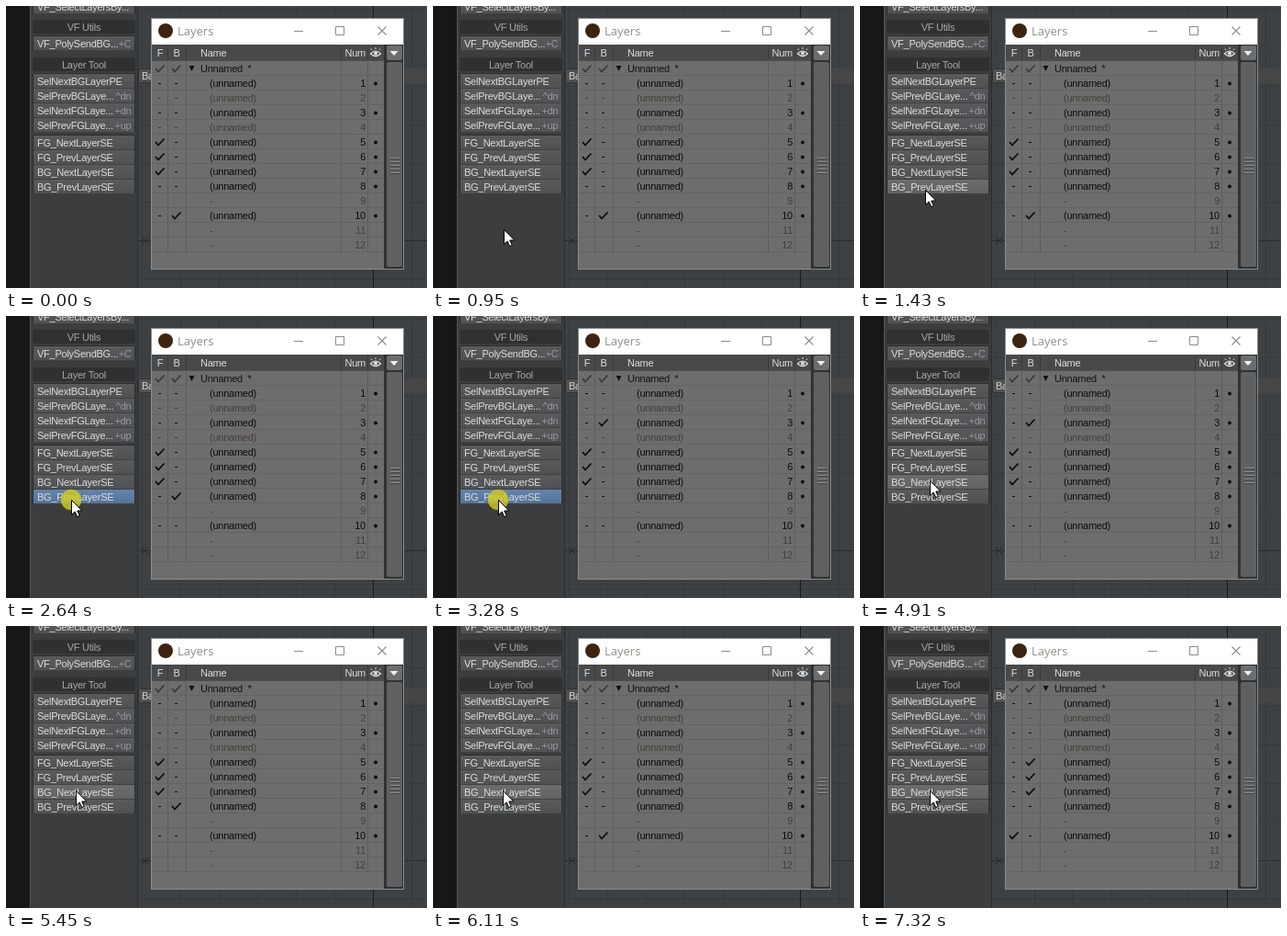
An HTML page that plays this animation: 459x307 px, repeating every 8000 ms.

```html
<!DOCTYPE html>
<html lang="en">
<head>
<meta charset="utf-8">
<title>Layer switching</title>
<style>
  html, body { margin: 0; width: 100%; height: 100%; overflow: hidden; background: #3e4143; }
  svg { display: block; width: 459px; height: 307px; }
  text { font: 11px "Liberation Sans", Arial, sans-serif; letter-spacing: -.25px; white-space: pre; }
  .title { font: 13px "Open Sans", "Noto Sans", sans-serif; letter-spacing: 0; }
</style>
</head>
<body>
<svg id="stage" viewBox="0 0 459 307"></svg>
<script>
const NS = 'http://www.w3.org/2000/svg';
const stage = document.getElementById('stage');

function add(tag, attrs, parent = stage) {
  const node = document.createElementNS(NS, tag);
  for (const key in attrs) node.setAttribute(key, attrs[key]);
  parent.appendChild(node);
  return node;
}
const rect = (x, y, width, height, fill, more) => add('rect', { x, y, width, height, fill, ...more });
const line = (d, stroke, width = 1) => add('path', { d, stroke, 'stroke-width': width, fill: 'none' });
function label(x, y, str, fill, anchor = 'start', cls = '') {
  const node = add('text', { x, y, fill, 'text-anchor': anchor, class: cls });
  node.textContent = str;
  return node;
}
function gradient(id, top, bottom) {
  const g = add('linearGradient', { id, x2: 0, y2: 1 }, defs);
  add('stop', { offset: 0, 'stop-color': top }, g);
  add('stop', { offset: 1, 'stop-color': bottom }, g);
}

const defs = add('defs', {});
gradient('plain', '#595a5c', '#505153');
gradient('hover', '#6b6c6e', '#626365');
gradient('press', '#6384ab', '#54749b');

// Viewport behind the window
rect(0, 0, 459, 307, '#3e4143');
for (let x = 148.5; x < 459; x += 42) line(`M${x} 0V307`, '#37393b');
for (let y = 3.5; y < 307; y += 42) line(`M144 ${y}H459`, '#37393b');
line('M144 255.5H459', '#2b2c2e');
line('M400.5 0V307', '#18191a');
line('M148 252l7 7m0-7l-7 7', '#222325');
rect(144, 68, 315, 16, '#444648');
rect(144.5, 68.5, 50, 15, '#505153', { rx: 2, stroke: '#303133' });
label(148, 80, 'Back', '#d2d2d2');

// Tool panel
rect(0, 0, 26, 307, '#171717');
rect(26, 0, 118, 307, '#3c3d3f');
line('M26.5 0V307', '#585858');
line('M143.5 0V307', '#2a2b2c');

function button(y, text, key) {
  const box = rect(30, y, 110, 15, 'url(#plain)');
  line(`M30 ${y + 15.5}H140`, '#3f4042');
  label(34, y + 12, text, '#dcdcdc');
  if (key) label(136.5, y + 12, key, '#989ba2', 'end');
  return box;
}
function group(y, rows) {
  rect(29, y - 1, 112, rows.length * 16 + 1, '#2c2d2e', { rx: 2 });
  return rows.map(([text, key], i) => button(y + i * 16, text, key));
}
function heading(y, text) {
  rect(29, y, 112, 15, '#2f3032', { rx: 2 });
  label(85, y + 12, text, '#a8a8a8', 'middle');
}

group(-7, [['VF_SelectLayersBy...']]);
heading(15, 'VF Utils');
group(33, [['VF_PolySendBG...', '+C']]);
heading(56, 'Layer Tool');
group(74, [
  ['SelNextBGLayerPE'],
  ['SelPrevBGLaye...', '^dn'],
  ['SelNextFGLaye...', '+dn'],
  ['SelPrevFGLaye...', '+up']
]);
const [, , nextButton, prevButton] = group(141, [
  ['FG_NextLayerSE'], ['FG_PrevLayerSE'], ['BG_NextLayerSE'], ['BG_PrevLayerSE']
]);

// Layers window
rect(158, 13, 276, 274, '#6d6d6d');
rect(158, 13, 276, 29, '#fff');
add('circle', { cx: 174, cy: 27, r: 8, fill: '#3c2410' });
label(187, 32, 'Layers', '#8f8f88', 'start', 'title');
line('M314 27.5h10', '#8c8c8c');
line('M359.5 22.5h9v9h-9z', '#8c8c8c');
line('M405.5 22.5l9 9m0-9l-9 9', '#8c8c8c', 1.1);

const HEAD = '#dedede';
rect(159, 42, 274, 17, '#48494b');
label(168, 55, 'F', HEAD, 'middle');
label(186, 55, 'B', HEAD, 'middle');
label(212, 55, 'Name', HEAD);
label(392, 55, 'Num', HEAD, 'end');
line('M397.5 52Q403 46 408.5 52Q403 57 397.5 52z', HEAD, 1.2);
add('circle', { cx: 403, cy: 51.5, r: 2, fill: HEAD });
line('M399 48l-1-1.5M403 47v-2M407 48l1-1.5', HEAD);
for (let i = 0; i <= 13; i++) line(`M159 ${59.5 + i * 16}H412`, i ? '#636363' : '#4e4e4e');
line('M176.5 59V268M196.5 59V268M365.5 59V268M394.5 59V268', '#5c5c5c');
line('M176.5 43V59M196.5 43V59M365.5 43V59M394.5 43V59', '#38393a');

rect(412, 42, 21, 244, '#303133');
rect(415, 43, 17, 16, '#6c6d6f', { rx: 2 });
add('path', { d: 'M418.5 49h9l-4.5 5z', fill: '#eee' });
rect(415, 61, 17, 223, '#5f6062', { rx: 2 });
for (let y = 165; y <= 182; y += 4) {
  line(`M419 ${y + .5}h11`, '#909090');
  line(`M419 ${y + 1.5}h11`, '#404040');
}
rect(158.5, 13.5, 275, 273, 'none', { stroke: '#8c8c8c' });

const tick = (x, y) => `M${x - 5} ${y}l3 3.5l6.5 -7`;
line(tick(168, 68), '#363636', 1.5);
line(tick(186, 68), '#363636', 1.5);
add('path', { d: 'M199.5 65h6l-3 6z', fill: '#111' });
label(212, 72, 'Unnamed  *', '#111');

const EMPTY = [9, 11, 12], DIM = [2, 4];
const cells = [];
for (let n = 1; n <= 12; n++) {
  const y = 68 + n * 16;
  const empty = EMPTY.includes(n), dim = DIM.includes(n);
  const color = empty || dim ? '#453f39' : '#0c0c0c';
  label(222, y + 4, empty ? '-' : '(unnamed)', color);
  label(392, y + 4, n, color, 'end');
  if (empty) continue;
  if (!dim) add('circle', { cx: 403, cy: y + .5, r: 1.9, fill: '#0c0c0c' });
  cells.push({ n, y, fore: line('', color), back: line('', color) });
}

// Pointer
const glow = add('circle', { r: 11.3, fill: '#d2cc20', opacity: .8 });
const pointer = add('path', {
  d: 'M.5 .5V16.5L4.2 13L6.7 18.6L9.2 17.5L6.8 12H11.8z',
  fill: '#fff', stroke: '#000', 'stroke-width': 1, 'stroke-linejoin': 'round'
});

// Each click: press time, update time, release time, new background layer
const CLICKS = [
  [2090, 2210, 2260, 8],
  [2640, 2640, 2820, 8],
  [2640, 2770, 2820, 3],
  [3280, 3410, 3460, 1],
  [4760, 4860, 4910, 3],
  [5370, 5450, 5450, 8],
  [6010, 6110, 6110, 10]
].filter(([down, update]) => update > down);
const LOOP = 8000, ENTER = 720, SWAP = 7320;

const clamp = v => Math.min(1, Math.max(0, v));
const mix = (a, b, k) => a + (b - a) * k;
const easeOut = k => 1 - (1 - k) ** 2;

function pointerAt(t) {
  if (t < 4200) {
    const k = easeOut(clamp((t - ENTER + 45) / 755));
    return [mix(87, 71, k), mix(307, 200, k)];
  }
  return [76, mix(197, 179, easeOut(clamp((t - 4200) / 330)))];
}

function mark(cell, x, y, on) {
  cell.setAttribute('d', on ? tick(x, y) : `M${x - 2} ${y + .5}h3`);
  cell.setAttribute('stroke-width', on ? 1.8 : 1);
}

function render(t) {
  const [x, y] = pointerAt(t);
  const shown = t >= ENTER;
  const pressed = CLICKS.some(([down, , up]) => t >= down && t < up);

  pointer.setAttribute('transform', `translate(${Math.round(x)} ${Math.round(y)})`);
  pointer.setAttribute('visibility', shown ? 'visible' : 'hidden');
  glow.setAttribute('cx', x);
  glow.setAttribute('cy', y);
  glow.setAttribute('visibility', pressed ? 'visible' : 'hidden');

  const active = pressed ? 'press' : 'hover';
  const overPrev = shown && y >= 189 && y < 205;
  const overNext = shown && y >= 173 && y < 189;
  prevButton.setAttribute('fill', `url(#${overPrev ? active : 'plain'})`);
  nextButton.setAttribute('fill', `url(#${overNext ? active : 'plain'})`);

  let fore = [5, 6, 7], back = [10];
  for (const [, update, , layer] of CLICKS) if (t >= update) back = [layer];
  if (t >= SWAP) [fore, back] = [back, fore];
  for (const c of cells) {
    mark(c.fore, 168, c.y, fore.includes(c.n));
    mark(c.back, 186, c.y, back.includes(c.n));
  }
}

const start = performance.now();
function frame() {
  render((performance.now() - start) % LOOP);
  requestAnimationFrame(frame);
}
frame();
</script>
</body>
</html>
```
